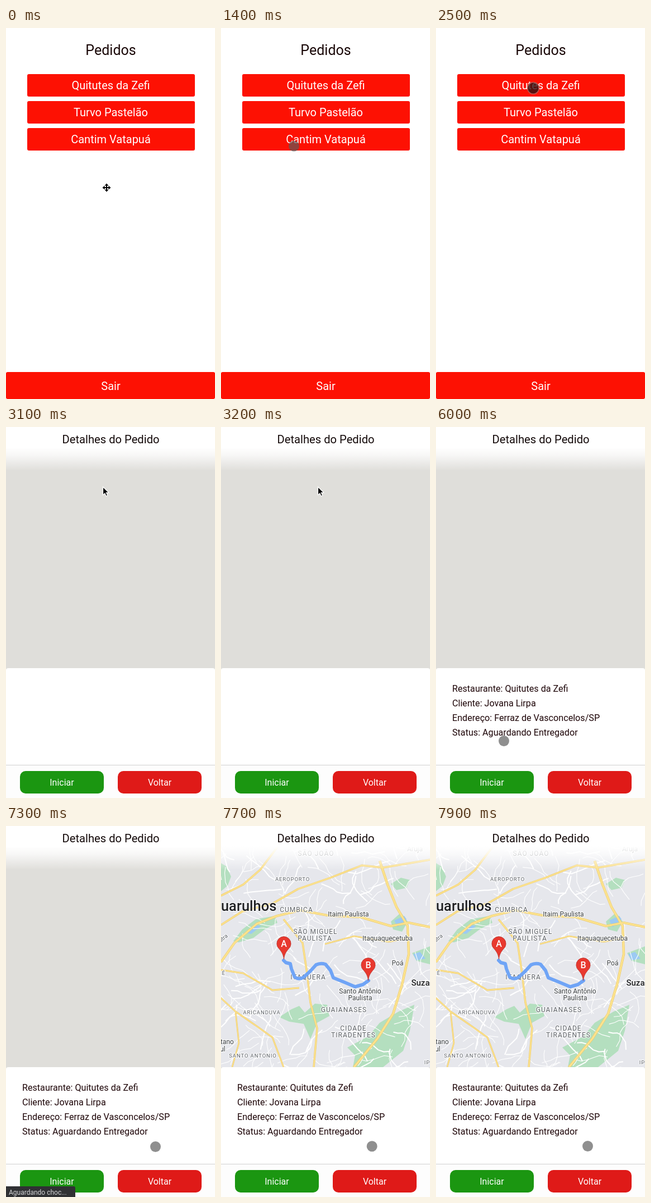
Animation, 374 px wide and 660 px high, one loop 8 s. Source, as an HTML page:

```html
<!DOCTYPE html>
<html lang="pt-BR">
<head>
<meta charset="utf-8">
<title>Pedidos</title>
<style>
  html, body { margin: 0; width: 100%; height: 100%; overflow: hidden; background: #fff; }
  svg { display: block; width: 374px; height: 660px; font-family: Roboto, "Open Sans", sans-serif; }
  .mid { text-anchor: middle; }
  .place { paint-order: stroke; stroke: #fff; stroke-opacity: .8; stroke-width: 2.5px; stroke-linejoin: round; }
</style>
</head>
<body>
<svg viewBox="0 0 374 660">
  <defs>
    <linearGradient id="fade" x2="0" y2="1">
      <stop offset="0" stop-color="#fff"/>
      <stop offset=".35" stop-color="#fff" stop-opacity=".75"/>
      <stop offset="1" stop-color="#fff" stop-opacity="0"/>
    </linearGradient>
    <clipPath id="mapArea"><path d="M0 36H374V429H0Z"/></clipPath>
  </defs>
  <rect width="374" height="660" fill="#fff"/>

  <g id="orders">
    <text class="mid" x="187.5" y="48" font-size="25" fill="#1a0808">Pedidos</text>
    <g id="orderButtons" fill="#fd1103"></g>
    <rect y="612" width="374" height="48" rx="3" fill="#fd1103"/>
    <text class="mid" x="187.5" y="644" font-size="20" fill="#fff">Sair</text>
  </g>

  <g id="details">
    <rect y="38" width="374" height="396" fill="#dfdeda"/>
    <g id="map" clip-path="url(#mapArea)">
      <rect y="36" width="374" height="393" fill="#e6e7ec"/>
      <g id="parks" fill="#b4dfbf"></g>
      <g id="water" fill="#9ccaf3"></g>
      <g id="streets" fill="none" stroke="#fff" stroke-linejoin="round"></g>
      <g id="highways" fill="none" stroke-linejoin="round"></g>
      <g id="labels"></g>
      <g id="route">
        <path d="M112 239L116 243L124 245L126 254L132 269Q140 274 148 269L160 258L170 247Q178 243 187 246L196 257L201 270L221 278L240 286L254 282L264 275"
          fill="none" stroke="#6fa4f6" stroke-width="6" stroke-linejoin="round" stroke-linecap="round"/>
        <g id="pins"></g>
      </g>
    </g>
    <rect y="36" width="374" height="42" fill="url(#fade)"/>
    <rect width="374" height="36.5" fill="#fff"/>
    <text class="mid" x="187.5" y="29" font-size="20.2" fill="#140a0a">Detalhes do Pedido</text>
    <path d="M0 433Q0 429 4 429H370Q374 429 374 433V602H0Z" fill="#fff"/>
    <g id="info" font-size="16.15" fill="#1e0508"></g>
    <rect y="601" width="374" height="59" fill="#fdfdfd"/>
    <path d="M0 601.5H374" stroke="#d0d0d0"/>
    <g class="mid" font-size="16" fill="#fff">
      <rect x="25" y="612" width="150" height="40" rx="10" fill="#1b9611"/>
      <text x="100" y="638">Iniciar</text>
      <rect x="200" y="612" width="150" height="40" rx="10" fill="#df1a18"/>
      <text x="275" y="638">Voltar</text>
    </g>
    <g id="status">
      <path d="M0 641H121Q124 641 124 644V660H0Z" fill="#303134"/>
      <text x="5" y="656" font-size="12" fill="#d5d5d7">Aguardando choc...</text>
    </g>
  </g>

  <path id="moveCursor" transform="translate(180 284)" stroke="#fff" stroke-width="1.2" paint-order="stroke"
    d="M0-7.5L3.5-3.5H1V-1H3.5V-3.5L7.5 0L3.5 3.5V1H1V3.5H3.5L0 7.5L-3.5 3.5H-1V1H-3.5V3.5L-7.5 0L-3.5-3.5V-1H-1V-3.5H-3.5Z"/>
  <path id="arrow" transform="translate(173.5 106.5)" stroke="#fff" stroke-width="1.2"
    d="M0 0V14.5L3.4 11.4L5.7 16.3L8.2 15.2L5.9 10.4H10.4Z"/>
  <circle id="touch"/>
</svg>
<script>
const LOOP = 8000, STEP = 100;
const $ = id => document.getElementById(id);

function add(parent, tag, attrs, text) {
  const node = document.createElementNS("http://www.w3.org/2000/svg", tag);
  for (const key in attrs) node.setAttribute(key, attrs[key]);
  if (text) node.textContent = text;
  return $(parent).appendChild(node);
}

let seed = 29;
function random() {
  seed = (seed * 16807) % 2147483647;
  return seed / 2147483647;
}

["Quitutes da Zefi", "Turvo Pastelão", "Cantim Vatapuá"].forEach((name, i) => {
  const y = 82 + 48 * i;
  add("orderButtons", "rect", { x: 38, y, width: 300, height: 40, rx: 3 });
  add("orderButtons", "text", { class: "mid", x: 187.5, y: y + 27, "font-size": 20, fill: "#fff" }, name);
});

["Restaurante: Quitutes da Zefi", "Cliente: Jovana Lirpa",
 "Endereço: Ferraz de Vasconcelos/SP", "Status: Aguardando Entregador"]
  .forEach((line, i) => add("info", "text", { x: 29, y: 471 + 26 * i }, line));

[
  "M0 66L10 72L18 90L12 106L0 116Z",
  "M22 205L38 184L62 166L96 160L101 172L78 184L58 199L32 207Z",
  "M104 340L126 326L140 320L150 332L168 316L190 318L194 338L172 350L160 379L148 352L122 348Z",
  "M236 429L240 408L226 394L264 374L284 350L318 330L346 318L338 364L326 400L290 429Z",
  "M304 103L322 92L338 96L332 110L314 114Z",
  "M304 170L322 154L334 170L324 188L308 184Z",
  "M342 226L374 214V246L350 240Z"
].forEach(d => add("parks", "path", { d }));

["M42 190L62 176L72 178L54 192Z", "M310 168L328 160L332 166L316 180Z", "M344 228L356 224L366 236L350 239Z"]
  .forEach(d => add("water", "path", { d }));

// Side streets: short wandering lines.
for (let i = 0; i < 190; i++) {
  let x = random() * 374, y = 40 + random() * 390, angle = random() * 6.28;
  let d = `M${x} ${y}`;
  for (let k = 0; k < 5; k++) {
    angle += (random() - .5) * 1.1;
    const length = 6 + random() * 12;
    x += Math.cos(angle) * length;
    y += Math.sin(angle) * length;
    d += `L${x.toFixed(1)} ${y.toFixed(1)}`;
  }
  add("streets", "path", { d, "stroke-width": i % 4 ? 1.1 : 2 });
}

const highways = [
  ["M0 242L24 208L64 174L100 160L142 150L196 160L250 162L304 178L336 172L374 180", 3.2],
  ["M0 124L40 104L70 78L102 36", 2.4],
  ["M0 176L38 152L92 138L138 112L196 92L252 70L290 74L374 60", 2.4],
  ["M284 62L298 104L314 144L334 178L336 228L324 282L308 334L280 378L238 429", 3.4],
  ["M112 166L146 208L154 262L160 314L172 360L166 429", 2.4],
  ["M0 256L40 262L92 292L140 288", 1.8],
  ["M0 306L26 330L58 352L92 376L112 429", 1.8],
  ["M20 429L32 386L26 330", 1.6],
  ["M186 210L238 196L300 206L334 200", 1.6]
];
for (const [color, extra] of [["#edc560", 1], ["#fbe28e", 0]])
  for (const [d, width] of highways) add("highways", "path", { d, stroke: color, "stroke-width": width + extra });

const town = { size: 12, fill: "#3c4043" };
const district = { size: 12, fill: "#5f6368", spacing: 1 };
const small = { size: 9.5, fill: "#5f6368", spacing: .9 };
const city = { size: 15, fill: "#202124", weight: 500 };
[
  ["SÃO JOÃO", 170, 53, district], ["Aruja", 347, 45, town],
  ["AEROPORTO", 128, 98, small], ["CUMBICA", 135, 153, district],
  ["Itaim Paulista", 228, 161, town],
  ["SÃO MIGUEL", 169, 192, district], ["PAULISTA", 168, 204, district],
  ["Itaquaquecetuba", 298, 204, town], ["Poá", 316, 248, town],
  ["ITAQUERA", 156, 273, district], ["Suza", 357, 284, city],
  ["Santo Antônio", 249, 298, town], ["Paulista", 249, 310, town],
  ["ARICANDUVA", 73, 335, small], ["GUAIANASES", 220, 331, district],
  ["CIDADE", 237, 364, district], ["TIRADENTES", 237, 376, district],
  ["SANTO ANTONIO", 57, 412, small], ["tano", 11, 388, town], ["ul", 3, 401, town],
  ["É", 5, 265, small], ["IP", 369, 424, small],
  ["Guarulhos", 41, 151, { size: 25.5, fill: "#202124", weight: 500 }]
].forEach(([name, x, y, style]) => add("labels", "text", {
  class: "mid place", x, y, "font-size": style.size, fill: style.fill,
  "font-weight": style.weight || 400, "letter-spacing": style.spacing || 0
}, name));
add("labels", "text", { class: "mid place", "font-size": 10, fill: "#5f6368", transform: "translate(6 202) rotate(-38)" }, "utra");

[["A", 112.5, 237], ["B", 263.5, 275]].forEach(([letter, x, y]) => {
  add("pins", "path", {
    transform: `translate(${x} ${y})`, fill: "#e8392f", stroke: "#b9302a", "stroke-width": .8,
    d: "M0 0C-1-9-4-13-8-18A12.6 12.6 0 1 1 8-18C4-13 1-9 0 0Z"
  });
  add("pins", "text", { class: "mid", x, y: y - 22, "font-size": 16, "font-weight": 500, fill: "#fff" }, letter);
});

// Touch positions: time, x, y.
const path = [
  [100, 259, 258], [200, 262.5, 257.5], [500, 262.5, 257.5], [800, 195, 253], [1000, 170, 243],
  [1200, 136, 224], [1400, 130.5, 210], [1700, 136, 186], [2000, 156, 144],
  [2300, 172, 113], [2400, 174, 107], [3500, 174, 107], [3800, 196, 240],
  [4100, 226, 410], [4400, 235, 478], [4600, 207.5, 480.5], [4900, 176, 500],
  [5200, 163, 526], [5400, 160, 528], [5700, 138, 544], [6000, 121.5, 558.5],
  [6200, 129, 564], [6500, 215, 569], [6700, 267.5, 570.5], [7300, 267.5, 570.5], [7900, 271.5, 569.5]
];

function touchAt(t) {
  const next = path.findIndex(point => point[0] > t);
  if (next < 1) return next < 0 ? path[path.length - 1].slice(1) : path[0].slice(1);
  const [t0, x0, y0] = path[next - 1], [t1, x1, y1] = path[next];
  const p = (t - t0) / (t1 - t0);
  return [x0 + (x1 - x0) * p, y0 + (y1 - y0) * p];
}

function show(id, visible) {
  $(id).style.display = visible ? "" : "none";
}

function render(t) {
  const opened = t >= 2800;
  const arrowShown = opened && t < 3600;
  const pressed = t >= 2400 && t < 2800;
  show("orders", !opened);
  show("details", opened);
  show("info", t >= 3300);
  show("status", t >= 7300 && t < 7700);
  show("map", t >= 7500);
  show("route", t >= 7700);
  $("map").style.opacity = Math.min(1, (t - 7400) / 300);
  show("moveCursor", t < 100);
  show("arrow", arrowShown);
  show("touch", t >= 100 && !arrowShown);

  const [x, y] = touchAt(t);
  const look = pressed
    ? { r: 10.3, fill: "rgba(40,18,18,.78)", stroke: "rgba(185,95,90,.8)", "stroke-width": 1.8 }
    : { r: 9.5, fill: "rgba(90,90,90,.68)", stroke: "none" };
  for (const [key, value] of Object.entries({ cx: x, cy: y, ...look })) $("touch").setAttribute(key, value);
}

const start = performance.now();
function tick(now) {
  const t = Math.max(0, now - start) % LOOP;
  render(Math.floor(t / STEP) * STEP);
  requestAnimationFrame(tick);
}
render(0);
requestAnimationFrame(tick);
</script>
</body>
</html>
```
